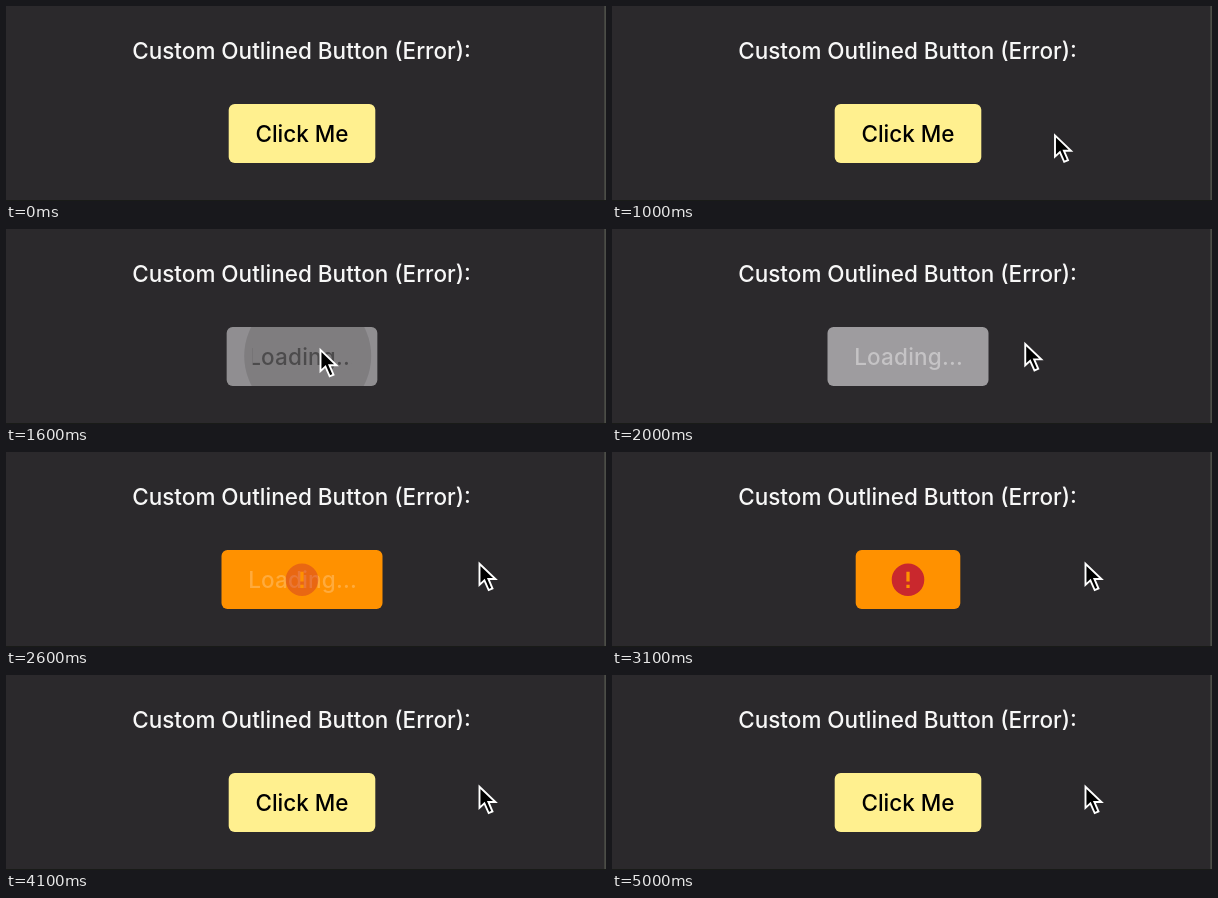
Animation, 600 px wide and 195 px high, one loop 5400 ms. Source, as an HTML page with a canvas:

```html
<!DOCTYPE html>
<html lang="en">
<head>
<meta charset="utf-8">
<title>Button states</title>
<style>
  html, body { margin: 0; width: 100%; height: 100%; overflow: hidden; background: #2b292c; }
  canvas { display: block; width: 600px; height: 195px; }
</style>
</head>
<body>
<canvas id="stage"></canvas>
<script>
const LOOP = 5400, STEP = 100;
const CENTER = 296, TOP = 98, HEIGHT = 59;
const YELLOW = '#fff08f', GREY = '#9e9c9f', ORANGE = '#ff9100', RED = '#c9282d';
const WIDTH = { idle: 146.6, loading: 161, error: 104.6 };

const canvas = document.getElementById('stage');
const ctx = canvas.getContext('2d');
const scale = window.devicePixelRatio || 1;
canvas.width = 600 * scale;
canvas.height = 195 * scale;

const lerp = (a, b, p) => a + (b - a) * p;
const progress = (t, start, length) => Math.min(1, Math.max(0, (t - start) / length));
const easeOut = p => 1 - (1 - p) ** 1.65;

// time, x, y of the pointer tip
const pointerPath = [
  [700, 481, 180], [800, 474, 160], [1000, 442, 127], [1200, 410, 123],
  [1400, 313.5, 118.5], [1800, 313.5, 118.5], [1900, 352, 116],
  [2100, 472.5, 109.3], [LOOP, 472.5, 109.3]
];

const arrow = new Path2D('M1 2.4V23.6L5.9 19.1L10.2 28.8L14 27.2L9.9 17.7H17Z');
const errorIcon = new Path2D(
  'M12 2a10 10 0 1 0 0 20a10 10 0 1 0 0-20ZM11 7h2v6h-2ZM11 15h2v2h-2Z');

function drawText(text, x, y, color, spacing = 0, alpha = 1) {
  ctx.save();
  ctx.globalAlpha *= alpha;
  ctx.font = '500 22.5px Inter, sans-serif';
  ctx.letterSpacing = spacing + 'px';
  ctx.textAlign = 'center';
  ctx.fillStyle = color;
  ctx.fillText(text, x + spacing / 2, y);
  ctx.restore();
}

function drawIcon(alpha) {
  ctx.save();
  ctx.globalAlpha = alpha;
  ctx.translate(CENTER, 127.8);
  ctx.scale(1.63, 1.63);
  ctx.translate(-12, -12);
  ctx.fillStyle = RED;
  ctx.fill(errorIcon, 'evenodd');
  ctx.restore();
}

function drawRipple(t) {
  const grow = (t - 1480) / 120;
  if (grow <= 0 || t >= 1800) return;
  const shift = Math.min(1, grow);
  ctx.fillStyle = `rgba(0,0,0,${t > 1600 ? 0.07 : 0.12})`;
  ctx.beginPath();
  ctx.arc(lerp(314, 301.7, shift), lerp(119, 127, shift), 63.5 * grow, 0, 7);
  ctx.fill();
}

function buttonWidth(t) {
  if (t < 2600) return lerp(WIDTH.idle, WIDTH.loading, progress(t, 1530, 250));
  if (t < 3600) return lerp(WIDTH.loading, WIDTH.error, easeOut(progress(t, 2600, 250)));
  return lerp(WIDTH.error, WIDTH.idle, easeOut(progress(t, 3600, 250)));
}

function drawButton(t) {
  const loading = t >= 1600 && t < 2600, error = t >= 2600 && t < 3600;
  const width = buttonWidth(t), left = CENTER - width / 2;
  const iconIn = progress(t, 2500, 250), iconOut = progress(t, 3570, 250);

  ctx.save();
  ctx.beginPath();
  ctx.roundRect(left, TOP, width, HEIGHT, 6);
  ctx.fillStyle = loading ? GREY : error ? ORANGE : YELLOW;
  ctx.fill();
  ctx.clip();
  if (t >= 1500 && t < 1800) {
    ctx.fillStyle = `rgba(0,0,0,${t < 1700 ? 0.09 : 0.05})`;
    ctx.fillRect(left, TOP, width, HEIGHT);
  }
  drawRipple(t);

  ctx.beginPath();
  ctx.rect(left + 26, TOP, width - 52, HEIGHT);
  ctx.clip();
  if (loading || error) {
    const shade = Math.round(255 * progress(t, 1600, 200));
    drawText('Loading...', CENTER + 0.5, 135.5, `rgb(${shade},${shade},${shade})`,
      0.2, 0.4 * (error ? 1 - iconIn : 1));
  } else {
    drawText('Click Me', CENTER, 135.5, '#000', 0, t < 3600 ? 1 : iconOut);
  }
  if (t >= 2600) drawIcon(error ? iconIn : 1 - iconOut);
  ctx.restore();
}

function drawPointer(t) {
  const next = pointerPath.findIndex(point => point[0] > t);
  if (next < 1) return;
  const [t0, x0, y0] = pointerPath[next - 1], [t1, x1, y1] = pointerPath[next];
  const p = progress(t, t0, t1 - t0);
  ctx.save();
  ctx.translate(lerp(x0, x1, p), lerp(y0, y1, p));
  ctx.fillStyle = '#000';
  ctx.strokeStyle = '#fff';
  ctx.lineWidth = 1.9;
  ctx.fill(arrow);
  ctx.stroke(arrow);
  ctx.restore();
}

function draw(now) {
  const t = Math.floor((now % LOOP) / STEP) * STEP;
  ctx.setTransform(scale, 0, 0, scale, 0, 0);
  ctx.fillStyle = '#2b292c';
  ctx.fillRect(0, 0, 600, 195);
  ctx.fillStyle = '#4c4d47';
  ctx.fillRect(598.3, 0, 1.7, 195);
  ctx.fillStyle = '#191b18';
  ctx.fillRect(0, 194, 600, 1);
  drawText('Custom Outlined Button (Error):', 295.5, 53, '#f7f7f7');
  drawButton(t);
  drawPointer(t);
}

const start = performance.now();
function tick() {
  draw(performance.now() - start);
  requestAnimationFrame(tick);
}
tick();
</script>
</body>
</html>
```
